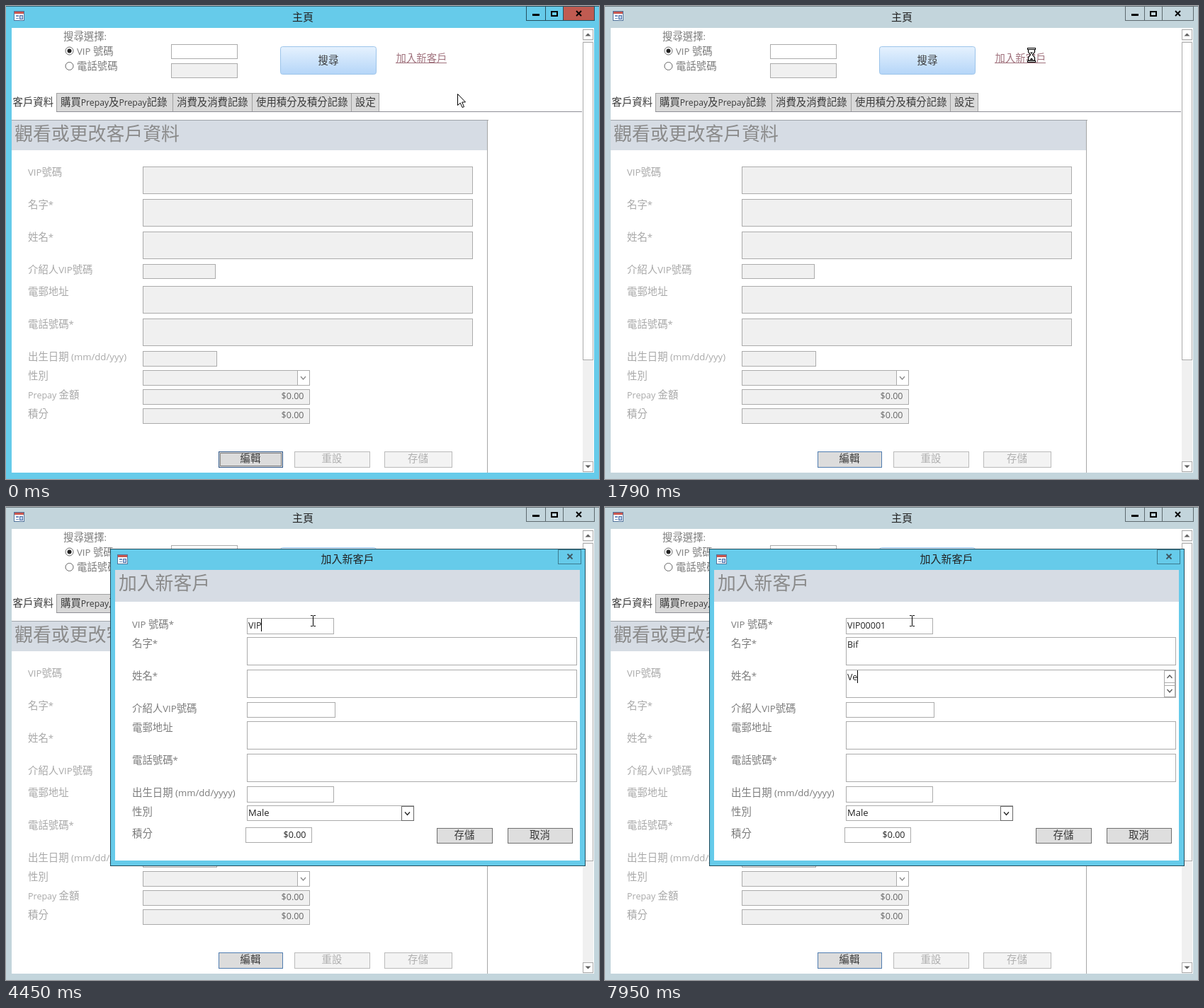
An HTML page with a canvas for the animation above (8000 ms loop, 837x669 px).

```html
<!DOCTYPE html>
<html lang="zh-Hant">
<head>
<meta charset="utf-8">
<title>客戶資料</title>
<style>
html, body { margin: 0; width: 100%; height: 100%; overflow: hidden; background: #fff; }
canvas { display: block; }
</style>
</head>
<body>
<canvas id="stage" width="837" height="669"></canvas>
<script>
const ctx = document.getElementById('stage').getContext('2d');
const LOOP = 8000;
const CJK = '"Noto Sans CJK TC", "Noto Sans CJK", sans-serif';
const LATIN = '"Open Sans", "Noto Sans", sans-serif';
const ACTIVE = '#66cbea', INACTIVE = '#c3d5dc';
const BORDER = '#ababab', GREY = '#f0f0f0', HEADER = '#d6dce4';
const HEADING = '#8a8a8a', INK = '#3a3a3a', LABEL = '#7c7c7c', FADED = '#a9a9a9';

function rect(x, y, w, h, color) {
  ctx.fillStyle = color;
  ctx.fillRect(x, y, w, h);
}

// Corners are inclusive pixels, with a one pixel border inside.
function box(x0, y0, x1, y1, fill, border = BORDER) {
  rect(x0, y0, x1 - x0 + 1, y1 - y0 + 1, border);
  rect(x0 + 1, y0 + 1, x1 - x0 - 1, y1 - y0 - 1, fill);
}

function poly(points, stroke, width, fill, closed) {
  ctx.beginPath();
  points.forEach(([x, y]) => ctx.lineTo(x, y));
  if (closed) ctx.closePath();
  if (fill) { ctx.fillStyle = fill; ctx.fill(); }
  if (stroke) { ctx.strokeStyle = stroke; ctx.lineWidth = width; ctx.stroke(); }
}

// Chinese and Latin runs use their own font and size.
function text(str, x, y, color, { cjk = 14.4, latin = 13.2, weight = 400, align = 0 } = {}) {
  const runs = str.match(/[\u3000-\u9fff]+|[^\u3000-\u9fff]+/g) || [];
  const parts = runs.map(run => {
    const font = /[\u3000-\u9fff]/.test(run)
      ? `${weight} ${cjk}px ${CJK}` : `400 ${latin}px ${LATIN}`;
    ctx.font = font;
    return { run, font, width: ctx.measureText(run).width };
  });
  const total = parts.reduce((sum, p) => sum + p.width, 0);
  let pen = x - total * align;
  ctx.fillStyle = color;
  for (const p of parts) {
    ctx.font = p.font;
    ctx.fillText(p.run, pen, y);
    pen += p.width;
  }
  return total;
}

function chevron(x, y, dir, color) {
  poly([[x - 3.5, y - 2 * dir], [x, y + 2 * dir], [x + 3.5, y - 2 * dir]], color, 1.3);
}

function triangle(x, y, dir) {
  poly([[x - 4, y - 2 * dir], [x + 4, y - 2 * dir], [x, y + 2 * dir]], null, 0, '#606060', true);
}

function cross(x, y, r, color, width) {
  poly([[x - r, y - r], [x + r, y + r]], color, width);
  poly([[x - r, y + r], [x + r, y - r]], color, width);
}

function formIcon(x, y) {
  box(x, y, x + 14, y + 13, '#fff', '#52749c');
  rect(x + 1, y + 1, 13, 3, '#c9574f');
  rect(x + 3, y + 6, 4, 2, '#6d8fc0');
  rect(x + 3, y + 10, 4, 1, '#6d8fc0');
  box(x + 8, y + 6, x + 12, y + 11, '#b9cfea', '#4a6fa8');
}

function radio(x, y, on) {
  ctx.beginPath();
  ctx.arc(x, y, 5.5, 0, 7);
  ctx.fillStyle = '#fff';
  ctx.fill();
  ctx.strokeStyle = '#666';
  ctx.lineWidth = 1;
  ctx.stroke();
  if (!on) return;
  ctx.beginPath();
  ctx.arc(x, y, 3, 0, 7);
  ctx.fillStyle = '#222';
  ctx.fill();
}

function button(x0, y0, x1, y1, label, fill, border, color) {
  box(x0, y0, x1, y1, fill, border);
  text(label, (x0 + x1) / 2, (y0 + y1) / 2 + 4, color, { align: 0.5 });
}

function titleBar(active) {
  const face = active ? ACTIVE : INACTIVE;
  const frame = active ? '#24505f' : '#5d696e';
  rect(0, 0, 837, 669, face);
  rect(0, 0, 837, 1, active ? '#2f6678' : '#6f7d83');
  formIcon(11, 7);
  text('主頁', 419, 21, '#222', { cjk: 15, align: 0.5 });
  box(734, 0, 761, 20, face, frame);
  box(761, 0, 786, 20, face, frame);
  box(786, 0, 830, 20, active ? '#c05b51' : face, frame);
  rect(743, 11, 10, 3, '#000');
  rect(769, 7, 10, 8, '#000');
  rect(771, 9, 6, 4, face);
  cross(808.5, 10.5, 3.5, '#000', 2);
  rect(8, 31, 822, 629, '#fff');
}

function scrollBar() {
  rect(814, 32, 15, 628, GREY);
  box(814, 33, 828, 47, '#fff');
  triangle(821.5, 40.5, -1);
  box(814, 51, 828, 500, '#fff');
  box(814, 644, 828, 658, '#fff');
  triangle(821.5, 651.5, 1);
}

function searchArea() {
  text('搜尋選擇:', 81, 48, LABEL);
  radio(89.5, 63.5, true);
  text('VIP 號碼', 100, 69, LABEL);
  radio(89.5, 85, false);
  text('電話號碼', 100, 90, LABEL);
  box(233, 54, 326, 74, '#fff');
  box(233, 81, 326, 101, GREY);

  const shade = ctx.createLinearGradient(0, 57, 0, 97);
  shade.addColorStop(0, '#e6f2fe');
  shade.addColorStop(1, '#b4d5f8');
  ctx.beginPath();
  ctx.roundRect(387.5, 57.5, 135, 39, 3);
  ctx.fillStyle = shade;
  ctx.fill();
  ctx.strokeStyle = '#9cc4ea';
  ctx.lineWidth = 1;
  ctx.stroke();
  text('搜尋', 455, 82, INK, { align: 0.5 });

  text('加入新客戶', 550.5, 79, '#a0727d');
  rect(550, 80, 72, 1, '#a0727d');
}

function tabs() {
  text('客戶資料', 9.5, 141, INK);
  const list = [
    ['購買Prepay及Prepay記錄', 71, 235], ['消費及消費記錄', 235, 347],
    ['使用積分及積分記錄', 347, 487], ['設定', 487, 526]
  ];
  for (const [label, x0, x1] of list) {
    box(x0, 123, x1, 149, '#d9d9d9', '#a0a0a0');
    text(label, x0 + 6, 141, INK, { latin: 12.2 });
  }
  rect(71, 149, 742, 1, '#8e8e96');
}

function mainForm(active) {
  rect(8, 161, 673, 1, '#a0a4aa');
  rect(679, 161, 1, 499, '#a6a6a6');
  rect(8, 162, 671, 42, HEADER);
  text('觀看或更改客戶資料', 12, 190, HEADING, { cjk: 25.9, weight: 300 });

  const rows = [
    ['VIP號碼', 240, 227, 265, 658], ['名字*', 286, 273, 311, 658],
    ['姓名*', 332, 319, 357, 658], ['介紹人VIP號碼', 378, 365, 385, 295],
    ['電郵地址', 409, 396, 434, 658], ['電話號碼*', 455, 442, 480, 658],
    ['出生日期 (mm/dd/yyy)', 501, 488, 509, 297], ['性別', 528, 515, 536, 428],
    ['Prepay 金額', 555, 542, 563, 428, '$0.00'], ['積分', 582, 569, 590, 428, '$0.00']
  ];
  for (const [label, base, y0, y1, x1, value] of rows) {
    const latin = label.startsWith('Prepay') ? 12.5 : 13.2;
    text(label, 31, base, FADED, { latin, weight: 300 });
    box(193, y0, x1, y1, GREY);
    if (value) text(value, 420.5, y0 + 14, '#666', { latin: 12.5, align: 1 });
  }
  box(411, 515, 428, 536, '#fff');
  chevron(419.5, 526, 1, '#888');

  button(300, 630, 390, 652, '編輯', '#dcdcdc', active ? '#2f5788' : '#4f7cb0', INK);
  if (active) {
    ctx.setLineDash([1, 1]);
    ctx.strokeStyle = '#222';
    ctx.lineWidth = 1;
    ctx.strokeRect(302.5, 632.5, 86, 18);
    ctx.setLineDash([]);
  }
  button(407, 630, 513, 652, '重設', '#f3f3f3', '#bababa', '#b0b0b0');
  button(534, 630, 629, 652, '存儲', '#f3f3f3', '#bababa', '#b0b0b0');
}

const typing = [
  { base: 172, focus: 1860, leave: 6270, keys: [4120, 4380, 4450, 4980, 5220, 5380, 5580, 5880], word: 'VIP00001' },
  { base: 199, focus: 6270, leave: 7350, keys: [6810, 6950, 7130], word: 'Bif' },
  { base: 245, focus: 7350, leave: LOOP, keys: [7740, 7950], word: 'Ve' }
];

function caretOn(t) {
  return !(t >= 2380 && t < 3210) && !(t >= 3740 && t < 4120);
}

function typedFields(t) {
  typing.forEach((field, i) => {
    const count = field.keys.filter(k => t >= k).length;
    const width = text(field.word.slice(0, count), 342, field.base, '#222', { latin: 12.5 });
    if (t < field.focus || t >= field.leave) return;
    if (caretOn(t)) rect(342 + Math.round(width), field.base - 14, 1, 18, '#000');
    if (i) spinner(field.base - 14);
  });
}

function spinner(y) {
  box(789, y, 804, y + 37, '#fff');
  rect(789, y + 17, 16, 1, BORDER);
  rect(789, y + 21, 16, 1, BORDER);
  chevron(797, y + 9, -1, '#555');
  chevron(797, y + 29, 1, '#555');
}

function dialog(t) {
  box(147, 59, 817, 507, ACTIVE, '#214b5a');
  formIcon(157, 67);
  text('加入新客戶', 482, 79, '#222', { cjk: 15, align: 0.5 });
  box(779, 60, 811, 80, ACTIVE, '#3b7b90');
  cross(796, 70, 3.5, '#3d5660', 1.8);
  rect(154, 89, 656, 411, '#fff');
  rect(154, 89, 656, 45, HEADER);
  text('加入新客戶', 159, 117, HEADING, { cjk: 25.8, weight: 300 });

  const rows = [
    ['VIP 號碼*', 171, 157, 179, 462], ['名字*', 198, 184, 223, 805],
    ['姓名*', 244, 230, 269, 805], ['介紹人VIP號碼', 290, 276, 297, 464],
    ['電郵地址', 317, 303, 342, 805], ['電話號碼*', 363, 349, 388, 805],
    ['出生日期 (mm/dd/yyyy)', 409, 395, 417, 462], ['性別', 436, 422, 443, 575],
    ['積分', 467, 453, 474, 431]
  ];
  for (const [label, base, y0, y1, x1] of rows) {
    text(label, 178, base, LABEL, { weight: 300 });
    box(label === '積分' ? 338 : 340, y0, x1, y1, '#fff');
  }
  text('Male', 342, 437, '#222', { latin: 13 });
  box(558, 423, 575, 443, '#fff', '#666');
  chevron(566.5, 433.5, 1, '#222');
  text('$0.00', 423.5, 468, '#222', { latin: 12.5, align: 1 });
  button(608, 454, 686, 475, '存儲', '#dedede', '#707070', INK);
  button(708, 454, 799, 475, '取消', '#dedede', '#707070', INK);
  typedFields(t);
}

const at = (x, y, points) => points.map(([px, py]) => [x + px, y + py]);

function arrow(x, y) {
  poly(at(x + 0.5, y + 0.5, [[0, 0], [0, 16], [3.7, 12.6], [6.6, 19], [9, 18], [6.2, 11.6], [11, 11.4]]),
    '#000', 1, '#fff', true);
}

function hand(x, y) {
  poly(at(x - 4, y, [[4.5, .5], [6.5, .5], [6.5, 6], [9, 6], [11.5, 7], [14.5, 8.5], [14.5, 13],
    [12.5, 18.5], [5, 18.5], [.5, 12], [.5, 10], [2, 9.5], [4.5, 12]]), '#000', 1, '#fff', true);
}

function hourglass(x, y) {
  poly(at(x, y, [[-4.5, -8], [4.5, -8], [4.5, -4], [1.5, 0], [4.5, 4], [4.5, 8], [-4.5, 8],
    [-4.5, 4], [-1.5, 0], [-4.5, -4]]), '#000', 1.2, '#fff', true);
  for (const top of [-10, 8]) {
    rect(x - 6, y + top, 12, 3, '#000');
    rect(x - 5, y + top + 1, 10, 1, '#fff');
  }
  poly(at(x, y, [[-2, -3.5], [2, -3.5], [0, -1]]), null, 0, '#000', true);
  poly(at(x, y, [[-2.5, 7], [2.5, 7], [0, 4.5]]), null, 0, '#000', true);
}

function beam(x, y) {
  rect(x - 3, y - 8, 3, 1, '#000');
  rect(x + 1, y - 8, 3, 1, '#000');
  rect(x, y - 7, 1, 14, '#000');
  rect(x - 3, y + 7, 3, 1, '#000');
  rect(x + 1, y + 7, 3, 1, '#000');
}

// Progress 0..1 in count jumps, the first at start and the last at end.
function stepped(t, start, end, count) {
  if (t < start) return 0;
  const gap = (end - start) / (count - 1);
  return Math.min(count, Math.floor((t - start) / gap + 1e-6) + 1) / count;
}

function cursor(t) {
  if (t < 1480) {
    const p = stepped(t, 670, 1210, 8);
    const ease = Math.sin(p * Math.PI / 2);
    const y = p === 1 ? 63 : 124 - 65 * Math.min(1, ease * 1.02);
    arrow(Math.round(637 - 35 * ease), Math.round(y));
  } else if (t < 1700) {
    hand(602, 67);
  } else if (t < 1860) {
    hourglass(602, 69);
  } else if (t < 2560) {
    const p = stepped(t, 2180, 2380, 4);
    const ease = p * p * (3 - 2 * p);
    arrow(Math.round(602 - 170 * ease), Math.round(68 + 90 * ease));
  } else {
    beam(433, t < 3410 ? 160 : 161);
  }
}

function draw(t) {
  const active = t < 1790;
  titleBar(active);
  scrollBar();
  searchArea();
  tabs();
  mainForm(active);
  if (t >= 1860) dialog(t);
  cursor(t);
}

const begin = performance.now();
function tick() {
  draw((performance.now() - begin) % LOOP);
  requestAnimationFrame(tick);
}
tick();
</script>
</body>
</html>
```
